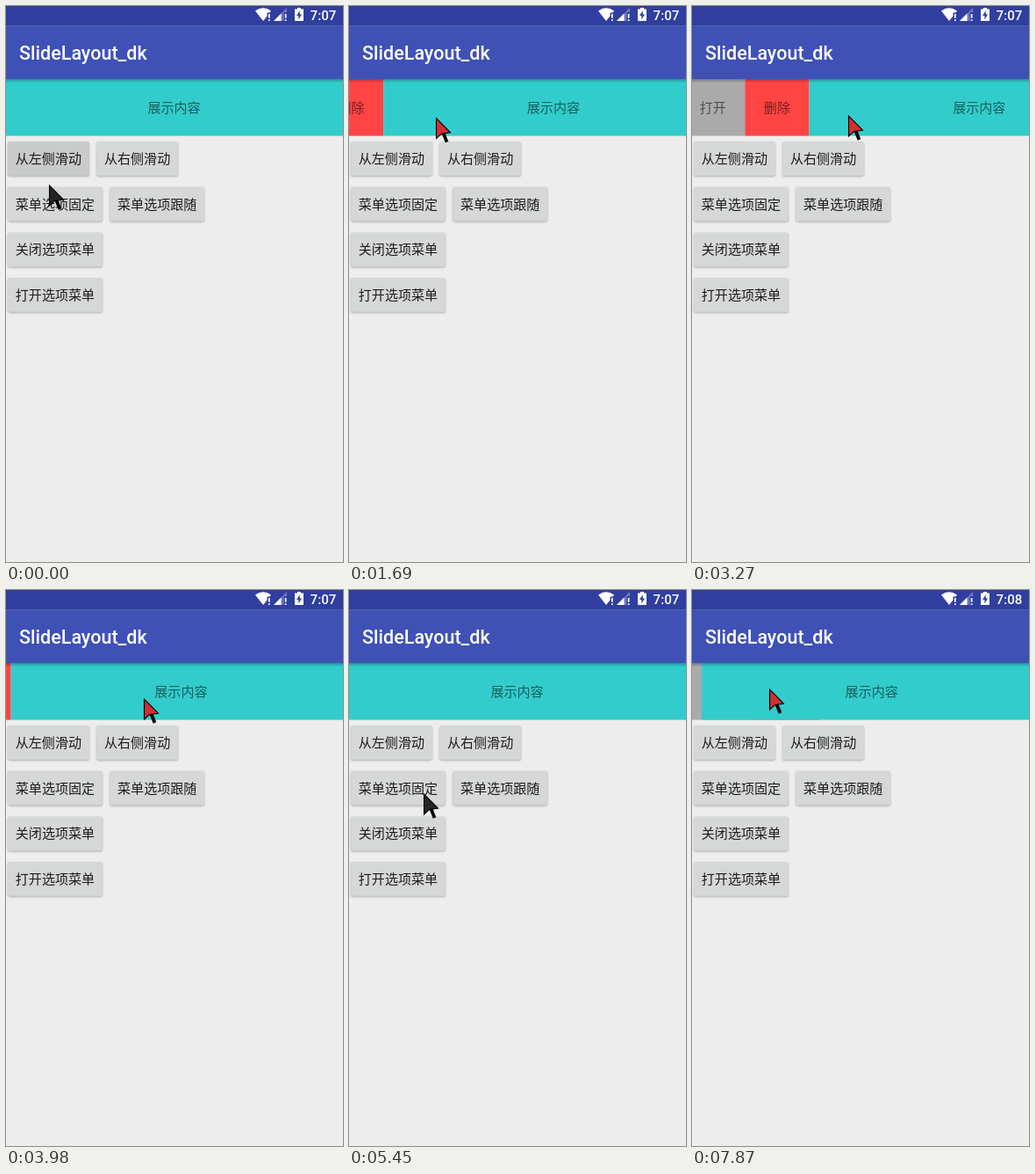
An HTML page that plays this animation: 384x632 px, repeating every 7990 ms.

```html
<!DOCTYPE html>
<html lang="zh">
<head>
<meta charset="utf-8">
<title>SlideLayout_dk</title>
<style>
  html, body { margin: 0; width: 100%; height: 100%; overflow: hidden; background: #ededed; }
  svg { display: block; width: 384px; height: 632px; }
  text { font: 14px "Noto Sans CJK SC", "Noto Sans CJK", sans-serif; text-anchor: middle; }
  .latin { font-family: Roboto, sans-serif; font-weight: 500; fill: #fff; }
  .title { font-size: 20px; text-anchor: start; }
  .clock { text-anchor: end; }
  .band text { fill: #000; fill-opacity: .54; }
  .button rect { fill: #d6d7d7; filter: drop-shadow(0 1px 1px rgba(0, 0, 0, .28)); }
  .button text { fill: #000; fill-opacity: .87; }
  .button.pressed rect { fill: #c9caca; }
</style>
</head>
<body>
<svg viewBox="0 0 384 632">
  <defs>
    <linearGradient id="shade" x2="0" y2="1">
      <stop stop-opacity=".28"/>
      <stop offset="1" stop-opacity="0"/>
    </linearGradient>
  </defs>
  <rect width="384" height="632" fill="#ededed"/>

  <!-- The app, laid out in density-independent pixels -->
  <g transform="translate(-2.2 -3.1) scale(1.0764)">
    <g class="band">
      <g id="menu">
        <rect y="80" width="68" height="60" fill="#aaa"/>
        <rect x="68" y="80" width="68" height="60" fill="#f44"/>
        <text x="34" y="115">打开</text>
        <text x="102" y="115">删除</text>
      </g>
      <g id="content">
        <rect y="80" width="360" height="60" fill="#3cc"/>
        <text x="180" y="115">展示内容</text>
      </g>
    </g>
    <rect y="80" width="360" height="4" fill="url(#shade)"/>
    <rect y="24" width="360" height="56" fill="#3f51b5"/>
    <rect width="360" height="24" fill="#303f9f"/>
    <text class="latin title" x="16" y="59.4">SlideLayout_dk</text>
    <text class="latin clock" id="clock" x="351.6" y="17.3">7:07</text>
    <g id="buttons"></g>
  </g>

  <g fill="#fff">
    <path d="M284 5.5Q293-1 302 5.5L300.5 7.5H297.5V11.5L293 17Z"/>
    <path d="M299 9h1.7v4.7H299zM299 15.2h1.7v1.7H299z"/>
    <path d="M320 2V7H316.5V17H305Z" fill-opacity=".3"/>
    <path d="M305 17L313.5 8.5V17Z"/>
    <path d="M317.8 9h1.7v4.7h-1.7zM317.8 15.2h1.7v1.7h-1.7z"/>
    <path fill-rule="evenodd" d="M329 3.5H332V2H336V3.5H339V17H329ZM334.8 5.2L331 11H333.4V15.4L337 9.6H334.8Z"/>
  </g>

  <g id="cursor">
    <path d="M8.5 18L12.5 28" stroke="#000" stroke-width="3.8"/>
    <path id="head" d="M.5 1V24L6.5 18.6L16.5 17.2Z" stroke="#000" stroke-width="1.1"/>
  </g>
</svg>
<script>
const LOOP = 7990;
const STEP = 130;          // time between screen refreshes
const MENU_WIDTH = 136;
const DRAG_GAIN = 1.11;    // content travel per pixel of pointer travel
const RELEASE = 3820;
const FIXED_MODE = 6030;

const $ = id => document.getElementById(id);
const between = (t, from, to) => t >= from && t < to;
const moveTo = (id, x, y = 0) => $(id).setAttribute('transform', `translate(${x} ${y})`);

const rows = [['从左侧滑动', '从右侧滑动'], ['菜单选项固定', '菜单选项跟随'], ['关闭选项菜单'], ['打开选项菜单']];
$('buttons').innerHTML = rows.map((labels, row) => labels.map((label, column) => {
  const width = label.length * 14 + 16;
  const x = 4 + column * (width + 8), y = 146 + row * 48;
  return `<g class="button"><rect x="${x}" y="${y}" width="${width}" height="36" rx="2"/>
    <text x="${x + width / 2}" y="${y + 23.2}">${label}</text></g>`;
}).join('')).join('');
const [leftButton, , fixedButton] = document.querySelectorAll('.button');

// Each pointer move: when it starts, how many refreshes it takes, where it ends.
const moves = [
  { start: 150, steps: 6, x: 77, y: 127 },
  { start: 1690, steps: 5, x: 187, y: 125 },
  { start: 2340, steps: 4, x: 198, y: 126 },
  { start: 2870, steps: 6, x: 168, y: 123 },
  { start: RELEASE, steps: 2, x: 157, y: 123 },
  { start: 4230, steps: 5, x: 153, y: 193 },
  { start: 4900, steps: 5, x: 85, y: 231 },
  { start: 5580, steps: 2, x: 70, y: 228 },
  { start: FIXED_MODE, steps: 3, x: 64, y: 112 },
  { start: 7090, steps: 7, x: 88, y: 112 }
];

const refreshes = (t, start) => t < start ? 0 : Math.floor((t - start) / STEP) + 1;

function pointerAt(t) {
  let x = 49, y = 203;
  for (const move of moves) {
    const k = Math.min(1, refreshes(t, move.start) / move.steps);
    x += (move.x - x) * k;
    y += (move.y - y) * k;
  }
  return { x, y };
}

// The content follows the pointer; once let go it springs shut.
function slideAt(t, x) {
  const grabX = t < FIXED_MODE ? 64.4 : 77;
  const dragged = Math.max(0, Math.min(MENU_WIDTH, (x - grabX) * DRAG_GAIN));
  return t < FIXED_MODE ? dragged * 0.266 ** refreshes(t, RELEASE) : dragged;
}

function draw(t) {
  const { x, y } = pointerAt(t);
  const slide = slideAt(t, x);
  const mouseDown = between(t, 540, 4080) || t >= 6610;

  moveTo('cursor', x, y);
  moveTo('content', slide);
  moveTo('menu', t < FIXED_MODE ? slide - MENU_WIDTH : 0);
  $('head').setAttribute('fill', mouseDown ? '#d02f33' : '#242424');
  $('clock').textContent = t < 7090 ? '7:07' : '7:08';
  leftButton.classList.toggle('pressed', t < 150);
  fixedButton.classList.toggle('pressed', between(t, FIXED_MODE, FIXED_MODE + STEP));
}

const began = performance.now();
function tick() {
  draw((performance.now() - began) % LOOP);
  requestAnimationFrame(tick);
}
tick();
</script>
</body>
</html>
```
